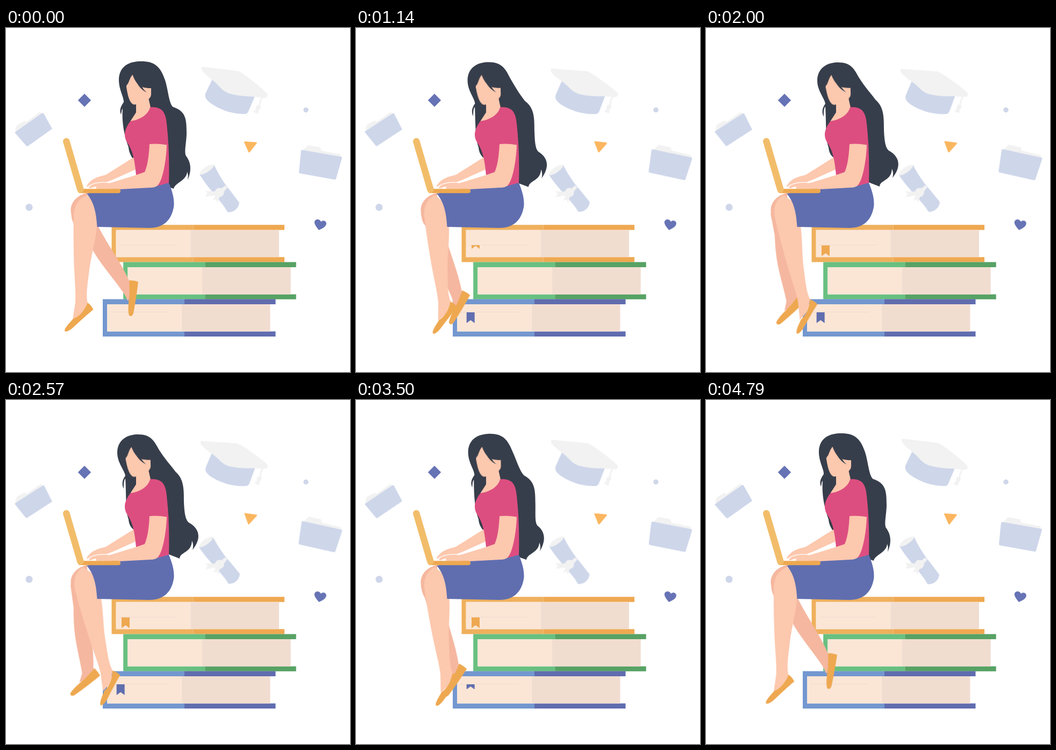
An HTML page without scripts for the animation above (4870 ms loop, 640 px wide and 640 px high).

```html
<!DOCTYPE html>
<html lang="en">
<head>
<meta charset="utf-8">
<title>Reading on a stack of books</title>
<style>
  html, body { margin: 0; width: 100%; height: 100%; overflow: hidden; background: #fff; }
  svg { display: block; width: 100%; height: 100%; }

  .blue { fill: #ced6ea; }
  .grey { fill: #f2f2f2; }
  .indigo { fill: #6673b5; }
  .skin { fill: #fcc8ae; }
  .shade { fill: #f5b79f; }
  .shoe { fill: #eea850; }
  .hair { fill: #373e4b; }
  .pink { fill: #dd4e80; }

  /* Soft sway shared by the head and the floating objects */
  .sway { animation: sway 4.87s ease infinite; transform-origin: var(--at); }
  @keyframes sway {
    0%, 100% { transform: none; }
    46%, 59% { transform: rotate(var(--turn)); }
  }

  /* Steady swing of legs and feet */
  .swing { animation: swing 4.87s linear infinite; transform-origin: var(--at); }
  @keyframes swing {
    0%, 100% { transform: rotate(0deg); }
    49.3% { transform: rotate(var(--turn)); }
  }

  .mark { animation: 4.87s linear infinite; }
  .low { animation-name: low; }
  .high { animation-name: high; }
  @keyframes low {
    0%, 8%, 77.2%, 100% { transform: translateY(-21px); }
    18.7%, 66.5% { transform: none; }
  }
  @keyframes high {
    0%, 19.7%, 88.9%, 100% { transform: translateY(-21px); }
    30.4%, 78.2% { transform: none; }
  }
</style>
</head>
<body>
<svg viewBox="0 0 640 640">
  <defs>
    <g id="book">
      <path fill="var(--a)" d="M0 0H152V9.5H8.2V60H152V69.3H0Z"/>
      <path fill="var(--b)" d="M152 0H321.5V9.5H152ZM152 60H321.5V69.3H152Z"/>
      <path fill="#fbe6d6" d="M8.2 9.5H146.8V60H8.2Z"/>
      <path fill="#f1ddd0" d="M146.8 9.5H311.5V60H146.8Z"/>
    </g>
    <path id="ribbon" d="M0 0H15V20L7.500 14.500L0 20Z"/>
    <clipPath id="highClip"><path d="M210 404.500h30v30h-30z"/></clipPath>
    <clipPath id="lowClip"><path d="M200 529h30v30h-30z"/></clipPath>
  </defs>

  <!-- floating objects -->
  <path class="indigo" d="M146 122.300L158.200 134.500L146 146.700L133.800 134.500Z"/>
  <circle class="blue" cx="43" cy="333.700" r="6.600"/>
  <circle class="blue" cx="558" cy="152.500" r="4.700"/>

  <g class="sway" style="--at: 51px 189px; --turn: 2.5deg">
    <path class="grey" d="M17 190L20 181L34 173L38 175L63 156L69 160L24 194Z"/>
    <path class="blue" d="M17 193.500L67 158.500Q69 157.500 70 159L86 187.500L41 219.500Q39 221 37.500 219L16.500 195Z"/>
  </g>

  <g class="sway" style="--at: 585px 252px; --turn: 2.5deg">
    <path class="grey" d="M552 228L562 218L585 222L586 228L622 235L624 242Z"/>
    <path class="blue" d="M549 228Q550 226.500 552 227L623 239.500Q625.500 240 625 242L614 280.500Q613 282.500 611 282L547 270.500Q545 270 545 268Z"/>
  </g>

  <g class="sway" style="--at: 445px 115px; --turn: -3deg">
    <path class="blue" d="M384 95L371 122C367 134 386 145 408 154C423 159 436 160 444 160Q449 160 451 155L463 127L420 105Z"/>
    <path class="grey" d="M366 72L432 80C442 84 479 114 485 121C489 126 486 130 482 130L463 128C445 127 430 126 416 122C400 117 397 106 384 97C375 90 366 82 364 77Q363 73 366 72Z"/>
    <path fill="none" stroke="#f2f2f2" stroke-width="3" d="M478 128Q472 135 471 148"/>
    <path class="grey" d="M468 143L474 146Q474 151 470 153L469 160L460 156L465 151Q464 146 468 143Z"/>
  </g>

  <g class="sway" style="--at: 397px 300px; --turn: -2.4deg">
    <path class="blue" d="M360 272L387 254C391 264 404 287 416 301L434 325C433 335 424 344 412 342.500C404 325 378 302 360 272Z"/>
    <path class="grey" d="M360 272C361 263 377 253 387 254C390 259 367 276 360 272Z"/>
    <path class="grey" d="M390 304L370 303L375 307L371 314L390 311L385 321L391 319L394 325L398 312L403 307L412 297L408 293L399 300Z"/>
    <circle class="grey" cx="397" cy="306" r="8.500"/>
  </g>

  <path class="sway" style="--at: 454px 219px; --turn: 4deg" fill="#fbb65f"
        d="M444 211L466 212.500Q467.500 213 466.500 214.500L453.500 231Q452 232.500 451 230.500L443 212.500Q443 211 444 211Z"/>
  <path class="indigo sway" style="--at: 584px 366px; --turn: -2deg"
        d="M582 376C578 371 572 364 574.500 359C577 354.500 584 355 586 360.500C590 356.500 596 359 596 364C595.500 370 588 373 582 376Z"/>

  <!-- books -->
  <use href="#book" x="196.500" y="366.200" style="--a: #efb05c; --b: #efa850"/>
  <use href="#book" x="218.200" y="435.500" style="--a: #68c080; --b: #57a264"/>
  <use href="#book" x="180" y="504.600" style="--a: #7397cf; --b: #606caf"/>
  <path stroke="#efd9cb" d="M210 404H318M194 528.500H302"/>
  <g clip-path="url(#highClip)"><g class="mark high"><use href="#ribbon" x="215" y="404.500" fill="#eea850"/></g></g>
  <g clip-path="url(#lowClip)"><g class="mark low"><use href="#ribbon" x="205.700" y="529" fill="#606eaf"/></g></g>

  <!-- far leg -->
  <path class="shade" d="M151 307C130 311 117 328 121.300 346C122 355 124 361 127 366L152 358Z"/>
  <g class="swing" style="--at: 128px 342px; --turn: 28deg">
    <path class="shade" d="M126 335L150 320L172 370C190 405 213 434 229 470L232 490L227.500 507C218 489 198 466 182 444C168 425 159 411 145 382L122 348Z"/>
    <g class="swing" style="--at: 237px 471px; --turn: 19deg">
      <path class="shade" d="M213 480L227 508L234 490L231 469Z"/>
      <path class="shoe" d="M229.500 469.500Q238 469 246 472C244 490 241 510 237 531C235 537 230 537.500 228.500 533C227 525 227.500 515 228.500 507C231 492 229 480 229.500 469.500Z"/>
    </g>
  </g>

  <!-- near leg -->
  <g class="swing" style="--at: 147px 342px; --turn: -17.2deg">
    <path class="skin" d="M152 311C133 317 126 333 126 352C125 385 126 425 127 450C128 475 130 492 129 510L124 543L140 533L152 512C148 497 152 475 155 450C158 425 167 397 169.500 366L168 330Z"/>
    <g class="swing" style="--at: 157px 517px; --turn: -4.3deg">
      <path class="shoe" d="M152 511Q159 516 162.500 524C152 532 136 547 124 558C118 563 112 566 109.500 564C108 562 111 557 116 551L125 541C138 536 145 526 152 511Z"/>
    </g>
  </g>

  <!-- hair and head -->
  <path class="hair">
    <animate attributeName="d" dur="4.87s" repeatCount="indefinite" calcMode="spline"
      keyTimes="0;.46;.59;1" keySplines=".25 .1 .25 1;0 0 1 1;.25 .1 .25 1"
      values="M248 62C275 61 287 70 296 97C302 116 303 141 311 147C334 155 336 168 336 195C336 212 331 230 335 238C341 246 348 260 338 283C339 276 339 272 337 268C336 284 314 288 312 299L290 292L240 242L235 242C232 236 229 232 228 222C220 200 215 175 217 150C215 152 215 156 214 161C211 154 212 148 219 138C220 130 210 115 210 97C210 75 224 63 248 62Z;
      M243 64C270 63 276 77 285 93C297 112 305 119 315 133C331 147 331 165 331 190C332 212 334 222 340 228C362 240 363 259 347 279C349 272 348 266 346 262C345 285 324 282 323 295L300 286L240 242L236 240C232 236 229 232 228 222C222 205 224 175 222 146C219 150 219 156 219 165C215 157 216 149 222 141C221 131 207 117 207 98C207 77 222 65 243 64Z;
      M243 64C270 63 276 77 285 93C297 112 305 119 315 133C331 147 331 165 331 190C332 212 334 222 340 228C362 240 363 259 347 279C349 272 348 266 346 262C345 285 324 282 323 295L300 286L240 242L236 240C232 236 229 232 228 222C222 205 224 175 222 146C219 150 219 156 219 165C215 157 216 149 222 141C221 131 207 117 207 98C207 77 222 65 243 64Z;
      M248 62C275 61 287 70 296 97C302 116 303 141 311 147C334 155 336 168 336 195C336 212 331 230 335 238C341 246 348 260 338 283C339 276 339 272 337 268C336 284 314 288 312 299L290 292L240 242L235 242C232 236 229 232 228 222C220 200 215 175 217 150C215 152 215 156 214 161C211 154 212 148 219 138C220 130 210 115 210 97C210 75 224 63 248 62Z"/>
  </path>
  <path class="skin" d="M242 138L242 157L231 174L262 176L269 148L265 130Z"/>
  <g class="sway" style="--at: 252px 147px; --turn: -2deg">
    <path class="skin" d="M235.500 87C231 92 230 97 228 101C227 105 223 106 224 110C226 122 229 140 238 142.500L244 142L266 147L265 133C267 130 270 129 270 122L270 112C258 112 250 110 244 103Q239 97 235.500 87Z"/>
    <path class="hair" d="M240 95C245 106 251 115 262 120C256 115 254 111 252 107Z"/>
  </g>

  <!-- body -->
  <path class="skin" d="M240 239L186 273C172 277 159 279 150 294C151 297 154 294 158 290C155 294 154 298 157 298L175 291L197 283L246 261Z"/>
  <path class="pink" d="M268 147.500C290 146 297 156 299 178C303 215 304 250 303 289L270 297L242 273.500C240 255 238 233 228 217C221 207 219 199 223 188Q227 178 232 173C244 172 264 164 268 147.500Z"/>
  <path fill="#606eaf" d="M150 308L200 299L272 296.500L303 288C309 303 313 315 312.500 330C309 357 293 372 267 372L169.500 370C168 344 164 324 150 308Z"/>
  <path class="skin" d="M267 216Q282 214.500 299 217.500C298 250 291 283 283 292Q279 297 268 297L212 300L176 299C170 300 165 299 168 295C160 296 156 300 154 297C160 289 180 283 195 288L242 273.500L258 268C264 255 266 235 267 216Z"/>
  <path fill="none" stroke="#fff" stroke-width="1.400" d="M152 298C156 290 172 285 193 288"/>

  <!-- laptop -->
  <g fill="none" stroke-linecap="round">
    <path stroke="#eea850" stroke-width="8" d="M138 303.300H209"/>
    <path stroke="#f2bd6a" stroke-width="12.500" d="M112.300 211L138.500 300.500"/>
  </g>
</svg>
</body>
</html>
```
